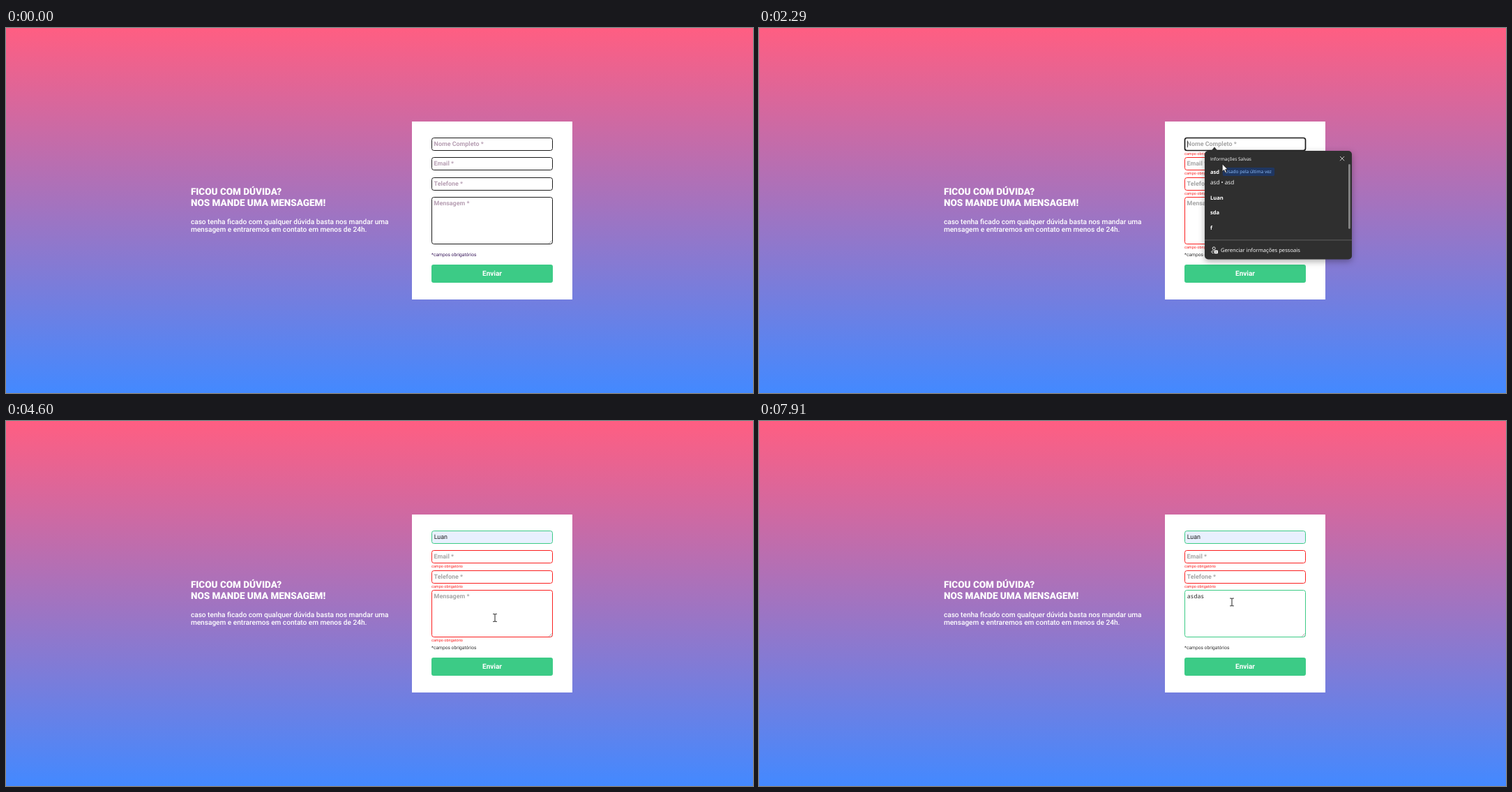
An HTML page that plays this animation: 1071 px wide and 523 px high, repeating every 7.99 s.

```html
<!DOCTYPE html>
<html lang="pt-BR">
<head>
<meta charset="utf-8">
<title>Formulário de contato</title>
<style>
  html, body { margin: 0; width: 100%; height: 100%; overflow: hidden; }
  svg { display: block; width: 1071px; height: 523px; text-rendering: geometricPrecision; }
  text { font-family: Roboto, sans-serif; white-space: pre; }
  .ui text { font-family: "Open Sans", "Noto Sans", sans-serif; fill: #fff; }
  .ui { filter: drop-shadow(0 3px 5px rgba(0, 0, 0, .32)); }
  .mono { font-family: "Noto Sans Mono", "DejaVu Sans Mono", monospace; font-weight: 500; }
  .preview { font-family: "Noto Sans", "Open Sans", sans-serif; }
</style>
</head>
<body>
<svg viewBox="0 0 1071 523">
  <defs>
    <linearGradient id="sky" x1="0" y1="0" x2="0" y2="1">
      <stop offset="0" stop-color="#ff5e82"/>
      <stop offset="1" stop-color="#4389ff"/>
    </linearGradient>
  </defs>
  <rect width="1071" height="523" fill="url(#sky)"/>
  <g fill="#fff">
    <g font-size="13.52" font-weight="900">
      <text x="264.9" y="239">FICOU COM DÚVIDA?</text>
      <text x="264.9" y="254.6">NOS MANDE UMA MENSAGEM!</text>
    </g>
    <g font-size="10.1" font-weight="500">
      <text x="264.9" y="280.7">caso tenha ficado com qualquer dúvida basta nos mandar uma</text>
      <text x="264.9" y="292.3">mensagem e entraremos em contato em menos de 24h.</text>
    </g>
    <rect x="582" y="134" width="230" height="255"/>
  </g>
  <g id="view"></g>
</svg>
<script>
const LOOP = 7990, PRESS = 70, KEY = 70;
const RED = '#fb1f1f', GREEN = '#3ccb86', BLACK = '#1a1a1a';
const PERSON = 'Luan';
const view = document.getElementById('view');

// Mouse presses
const click = { send: 1000, name: 1820, pick: 3000, resend: 3780, message: 5000, leave: 5930, finish: 6830 };

// Pointer moves: each runs from the previous place to x, y; lift bows the way
const home = { x: 1012, y: 487 };
const moves = [
  { start: 190, end: 660, x: 725.5, y: 357, lift: -110 },
  { start: 1330, end: 1820, x: 664, y: 168 },
  { start: 2150, end: 2760, x: 664.5, y: 243 },
  { start: 3140, end: 3710, x: 716.5, y: 357, lift: -18 },
  { start: 3850, end: 4130, x: 852, y: 305 },
  { start: 4130, end: 4600, x: 701, y: 282 },
  { start: 5420, end: 5890, x: 889.5, y: 327 },
  { start: 6030, end: 6570, x: 735.5, y: 351 },
  { start: 7160, end: 7440, x: 907, y: 305 },
  { start: 7440, end: 7910, x: 678, y: 259.5 }
];

const fields = ['Nome Completo *', 'Email *', 'Telefone *', 'Mensagem *'].map((label, i) =>
  ({ label, y: Math.round(157 + 28.4 * i), h: i < 3 ? 18 : 67 }));

const rows = ['asd', PERSON, 'sda', 'f'].map((name, i) => i
  ? { name, y: 210.5 + 21.5 * i, h: 21, base: 224.1 + 21.5 * i }
  : { name, y: 198, h: 32, base: 208.6 });

const within = (t, a, b) => t >= a && t < b;
const text = (x, y, size, fill, s, extra = '') =>
  `<text x="${x}" y="${y}" font-size="${size}" fill="${fill}" ${extra}>${s}</text>`;
const rect = (x, y, w, h, r, fill, extra = '') =>
  `<rect x="${x}" y="${y}" width="${w}" height="${h}" rx="${r}" fill="${fill}" ${extra}/>`;

function pointer(t) {
  let at = home;
  for (const m of moves) {
    if (t < m.start) break;
    const k = Math.min(1, (t - m.start) / (m.end - m.start));
    const e = Math.sin(k * Math.PI / 2);
    at = {
      x: at.x + (m.x - at.x) * e,
      y: at.y + (m.y - at.y) * e + (m.lift || 0) * Math.sin(e * Math.PI)
    };
  }
  return at;
}

function field(f, s) {
  const w = s.focus ? 1.7 : 1;
  let out = rect(610.5, f.y + .5, 173, f.h, 3, s.fill, `stroke="${s.stroke}" stroke-width="${w}"`);
  out += s.value
    ? text(613.7, f.y + 12.4, s.size, '#222', s.value, `class="${s.font}"`)
    : text(613.6, f.y + 12.4, 8.93, s.hint, f.label, 'font-weight="700"');
  if (s.focus) out += rect(s.caret, f.y + 4.5, .8, 9.6, 0, BLACK);
  if (s.error) out += text(610, f.y + f.h + 7.3, 5.5, RED, 'campo obrigatório');
  return out;
}

function form(t, over, hovered) {
  const sent = t >= click.send + PRESS;
  const ok = [t >= click.resend + PRESS, false, false, t >= click.finish + PRESS];
  const focus = [within(t, click.name + PRESS, click.resend), false, false, within(t, click.message + PRESS, click.leave)];
  const typed = 'asdas'.slice(0, Math.max(0, Math.floor((t - click.message) / KEY) - 1));
  let out = '';
  fields.forEach((f, i) => {
    const s = {
      hint: sent ? '#a6a6a6' : '#b79fb3', fill: '#fff', size: 8.93, font: '', value: '', caret: 614,
      focus: focus[i], error: sent && !ok[i],
      stroke: focus[i] || !sent ? BLACK : ok[i] ? GREEN : RED
    };
    if (i === 0 && t >= click.pick + PRESS) {
      Object.assign(s, { value: PERSON, fill: '#e8f0fe', caret: 633.2 });
    } else if (i === 0 && hovered) {
      Object.assign(s, { value: hovered.name, fill: '#e3f0ff', font: 'preview', size: 8.4 });
    } else if (i === 3) {
      Object.assign(s, { value: typed, font: 'mono', size: 8.18, caret: 614 + 4.91 * typed.length });
    }
    out += field(f, s);
  });
  out += '<path d="M778.6 308.6l4-4M781.2 308.6l1.4-1.4" stroke="#777" stroke-width=".7"/>';
  out += text(610, 326.7, 6.69, sent ? '#333' : '#3a1a5c', '*campos obrigatórios');
  return out + `<g transform="translate(697 352) scale(${over ? 1.02 : 1})">`
    + rect(-87, -13, 174, 26, 3, GREEN)
    + text(0, 3.2, 10.04, '#fff', 'Enviar', 'font-weight="700" text-anchor="middle"') + '</g>';
}

function popup(hovered) {
  let out = '<g class="ui"><path d="M647.5 177l5.5-6.5 5.5 6.5z" fill="#2f2f2f"/>'
    + rect(639, 176, 211, 155.5, 5, '#2f2f2f');
  if (hovered) out += rect(642, hovered.y, 200, hovered.h, 2.5, '#525252');
  out += text(647, 190.3, 6.55, '', 'Informações Salvas')
    + '<path d="M833 184l6.2 6.2M839.2 184l-6.2 6.2" stroke="#ddd" stroke-width=".9"/>'
    + rect(664.8, 200, 74.4, 12, 2, '#1f3661')
    + text(668, 208.4, 6.55, '', 'Usado pela última vez', 'style="fill:#8fc0ff"')
    + text(647, 224.2, 8.2, '', 'asd • asd');
  for (const r of rows) out += text(647, r.base, 7.6, '', r.name, 'font-weight="700"');
  out += rect(845, 195, 2.8, 93, 1.4, '#858585')
    + rect(639, 303.5, 211, .8, 0, '#6a6a6a')
    + '<g fill="none" stroke="#fff" stroke-width=".9"><circle cx="652.2" cy="315.8" r="2"/>'
    + '<path d="M651.5 322.6c-3.4-.4-3.4-3.1-1.4-3.1h1.6"/></g>'
    + rect(652.6, 318.6, 5.4, 4.6, .9, '#fff') + rect(653.8, 320.6, 3, .8, 0, '#2f2f2f')
    + text(662, 321, 7.65, '', 'Gerenciar informações pessoais');
  return out + '</g>';
}

const cursors = {
  arrow: '<path d="M0 0v11l2.5-2.3 1.7 4 2-.9-1.7-3.8h3.4z" fill="#fff" stroke="#111" stroke-width=".8"/>',
  hand: '<g transform="translate(.6 .8)" stroke="#111"><path d="M-1.1 .7C-1.1-.7 1-.7 1 .7V5.2l4.6 1.1c1.3.4 1.8 1 1.6 2.3l-1 4.2-.8 2.3H-.2l-3.3-5.4c-.7-1.3.7-2 1.5-1.1l.9 1z" fill="#fff" stroke-width=".9"/><path d="M2.8 5.8v2M4.6 6.3v1.8" stroke-width=".6"/></g>',
  beam: '<path d="M-2.8-5.4h2q.8 0 .8.8.1-.8.8-.8h2M0-4.6v9.2M-2.8 5.4h2q.8 0 .8-.8 0 .8.8.8h2" fill="none" stroke="#222" stroke-width="1"/>'
};

function draw(t) {
  const p = pointer(t), shown = t >= moves[0].start;
  const inBox = (x, y, w, h) => shown && within(p.x, x, x + w) && within(p.y, y, y + h);
  const open = within(t, click.name + 2 * PRESS, click.pick + PRESS);
  const over = inBox(608, 338.5, 178, 27);
  const covered = open && inBox(639, 176, 211, 155.5);
  const hovered = covered && rows.find(r => inBox(642, r.y, 200, r.h));
  let out = form(t, over, hovered);
  if (open) out += popup(hovered);
  if (shown) {
    const writing = !covered && fields.some(f => inBox(610, f.y, 174, f.h));
    const pressed = Object.values(click).some(c => within(t, c, c + PRESS));
    out += `<g transform="translate(${p.x} ${p.y})">`
      + cursors[over ? 'hand' : writing ? 'beam' : 'arrow']
      + (pressed ? '<circle r="8.3" fill="#ffeb00" fill-opacity=".5"/>' : '') + '</g>';
  }
  view.innerHTML = out;
}

const begin = performance.now();
function tick() {
  draw((performance.now() - begin) % LOOP);
  requestAnimationFrame(tick);
}
tick();
</script>
</body>
</html>
```
